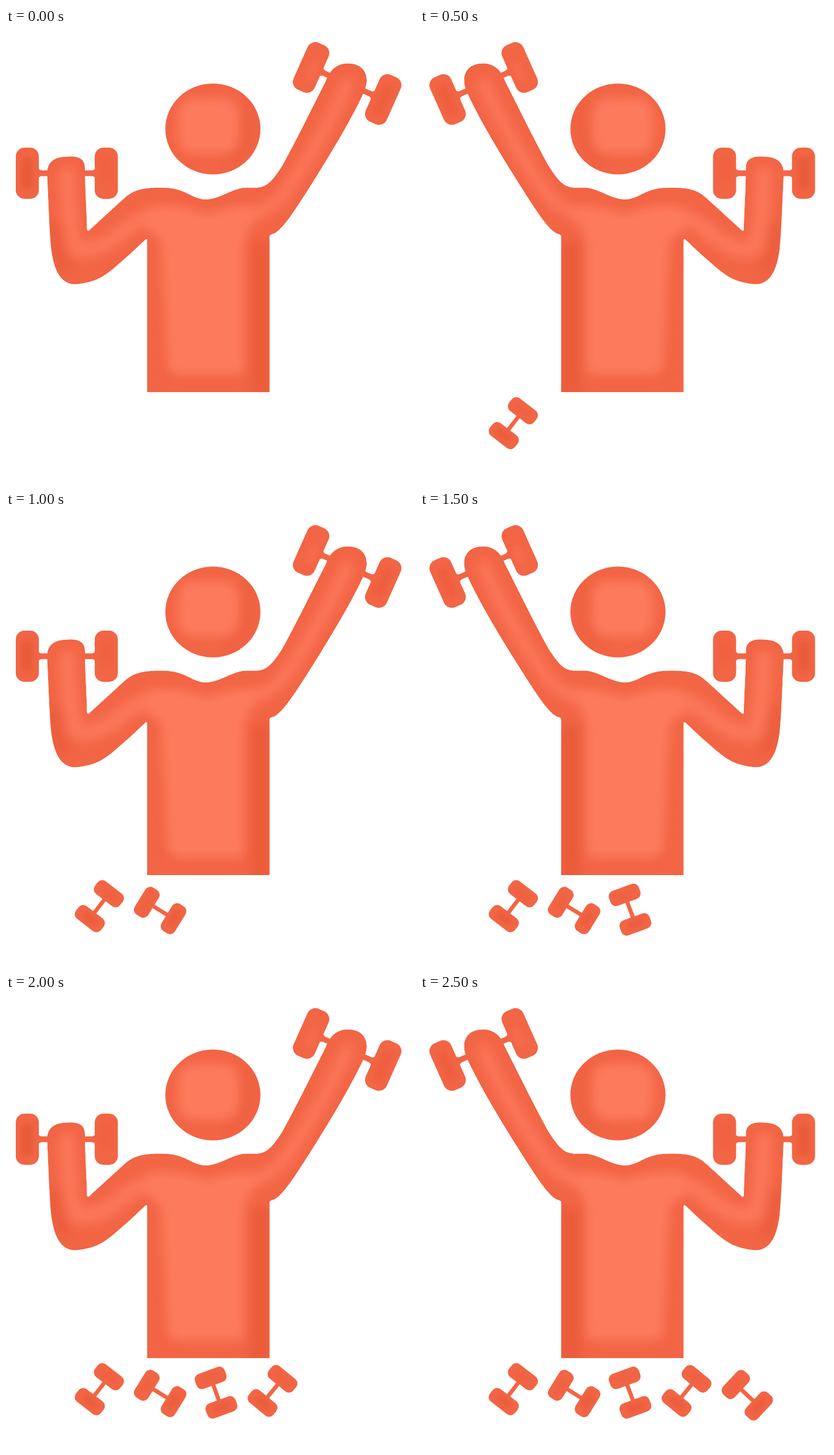
These frames come from a looping animation (708 by 791 pixels, 3000 ms). An HTML page:

```html
<!DOCTYPE html>
<html lang="en">
<head>
<meta charset="utf-8">
<title>Dumbbell workout</title>
<style>
  html, body { margin: 0; width: 100%; height: 100%; overflow: hidden; background: #fff; }
  svg { display: block; width: 708px; height: 791px; }
</style>
</head>
<body>
<svg viewBox="0 0 708 791" xmlns="http://www.w3.org/2000/svg">
  <defs>
    <filter id="soft" x="-50%" y="-50%" width="200%" height="200%" color-interpolation-filters="sRGB">
      <feGaussianBlur stdDeviation="9"/>
    </filter>
    <filter id="fine" x="-80%" y="-80%" width="260%" height="260%" color-interpolation-filters="sRGB">
      <feGaussianBlur stdDeviation="5"/>
    </filter>
    <path id="body" d="M245 633 V368 L243 367 C231 378 218 391 205 402
      C187 418 170 434 150 440 C136 444 127 445.500 118 445.500
      C94 444 83 420 78.500 385 C75 350 73.500 300 71.500 258
      C70 240 76 224 106 223.500 C130 222 137 230 137 244
      L137.500 270 C138.500 300 140.500 330 140.500 350 Q142 355 146 350
      L205 296 C222 280 240 277.500 265 277.500 C312 276 320 297 347 298
      C370 298 395 277.500 416 277.500 L436 277.500 C454 276.500 464 263 479 240
      C504 195 532 137 555 92 C562 72 575 61.500 593 61.500
      C615 61.500 626 74 626 91 C626 98 624 104 620.500 113
      C596 166 556 231 520.500 287 C498 322 480 350 465 357.500
      Q458 359 457.500 362 V633 Z"/>
    <clipPath id="bodyClip"><use href="#body"/></clipPath>
    <clipPath id="headClip"><ellipse cx="359" cy="175.500" rx="82.500" ry="79"/></clipPath>
    <g id="weight" fill="#f26545">
      <path d="M-50 -10 Q-48 -5 -43 -5 H43 Q48 -5 50 -10 V10 Q48 5 43 5 H-43 Q-48 5 -50 10 Z"/>
      <rect x="-88.500" y="-44.500" width="40" height="89" rx="15"/>
      <rect x="48.500" y="-44.500" width="40" height="89" rx="15"/>
    </g>
    <g id="small" fill="#f26545">
      <rect x="-20" y="-3.500" width="40" height="7"/>
      <rect x="-41" y="-27.500" width="27.500" height="55" rx="10"/>
      <rect x="13.500" y="-27.500" width="27.500" height="55" rx="10"/>
      <rect x="-33" y="-15" width="12" height="30" rx="5" fill="#ee6040" filter="url(#fine)"/>
      <rect x="21" y="-15" width="12" height="30" rx="5" fill="#e95b3b" filter="url(#fine)"/>
    </g>
  </defs>

  <g id="lifter">
    <g transform="translate(105.500 252.500)">
      <use href="#weight"/>
      <rect x="-79" y="-28" width="20" height="56" rx="8" fill="#e95b3b" filter="url(#fine)"/>
      <rect x="59" y="-28" width="20" height="40" rx="8" fill="#ef6141" filter="url(#fine)"/>
    </g>
    <g transform="translate(592 96.500) rotate(24)">
      <use href="#weight"/>
      <rect x="-72" y="-12" width="16" height="36" rx="8" fill="#f56c4d" filter="url(#fine)"/>
      <rect x="59" y="-28" width="20" height="56" rx="8" fill="#ed5f3f" filter="url(#fine)"/>
    </g>
    <g clip-path="url(#bodyClip)">
      <use href="#body" fill="#f26545"/>
      <g filter="url(#soft)">
        <path d="M441 372 V640" stroke="#e95b3a" stroke-width="32" fill="none"/>
        <path d="M84 340 Q86 402 108 418" stroke="#e95b3a" stroke-width="18" fill="none"/>
        <path d="M106 256 Q108 340 122 384 Q156 394 205 352 Q240 322 290 326"
          fill="none" stroke="#fb7658" stroke-width="30" stroke-linecap="round" stroke-linejoin="round"/>
        <path d="M592 98 C560 170 515 245 478 294 Q445 325 400 335"
          fill="none" stroke="#fb7658" stroke-width="24" stroke-linecap="round"/>
        <path d="M245 312 Q295 302 347 324 Q400 306 437 310 L414 370 V590 Q414 602 400 602 H300 Q284 602 281 588 L270 370 L240 345 Z" fill="#fd7b5d"/>
      </g>
    </g>
    <g clip-path="url(#headClip)">
      <rect x="270" y="90" width="180" height="170" fill="#f26545"/>
      <path d="M420 120 Q440 190 390 238" fill="none" stroke="#ee6141" stroke-width="18" filter="url(#soft)"/>
      <rect x="299" y="122" width="104" height="96" rx="26" fill="#fd7b5d" filter="url(#soft)"/>
    </g>
  </g>
  <g id="floor"></g>
</svg>
<script>
  const STEP = 500, LOOP = 3000;
  const lifter = document.getElementById("lifter");
  const floor = document.getElementById("floor");

  // x, y, angle of each weight left on the floor
  const spots = [
    [162, 687, 127.5],
    [267.5, 694.5, 31.5],
    [364.5, 693, 70],
    [462.5, 690, 129.5],
    [568, 697.5, 43]
  ];
  const weights = spots.map(([x, y, angle]) => {
    const el = document.createElementNS("http://www.w3.org/2000/svg", "use");
    el.setAttribute("href", "#small");
    el.setAttribute("transform", `translate(${x} ${y}) rotate(${angle})`);
    return floor.appendChild(el);
  });

  function draw(time) {
    const step = Math.floor((time % LOOP) / STEP);
    lifter.setAttribute("transform", step % 2 ? "translate(702.5 0) scale(-1 1)" : "");
    weights.forEach((el, i) => el.setAttribute("visibility", i < step ? "visible" : "hidden"));
  }

  function tick() {
    draw(performance.now());
    requestAnimationFrame(tick);
  }
  tick();
</script>
</body>
</html>
```
